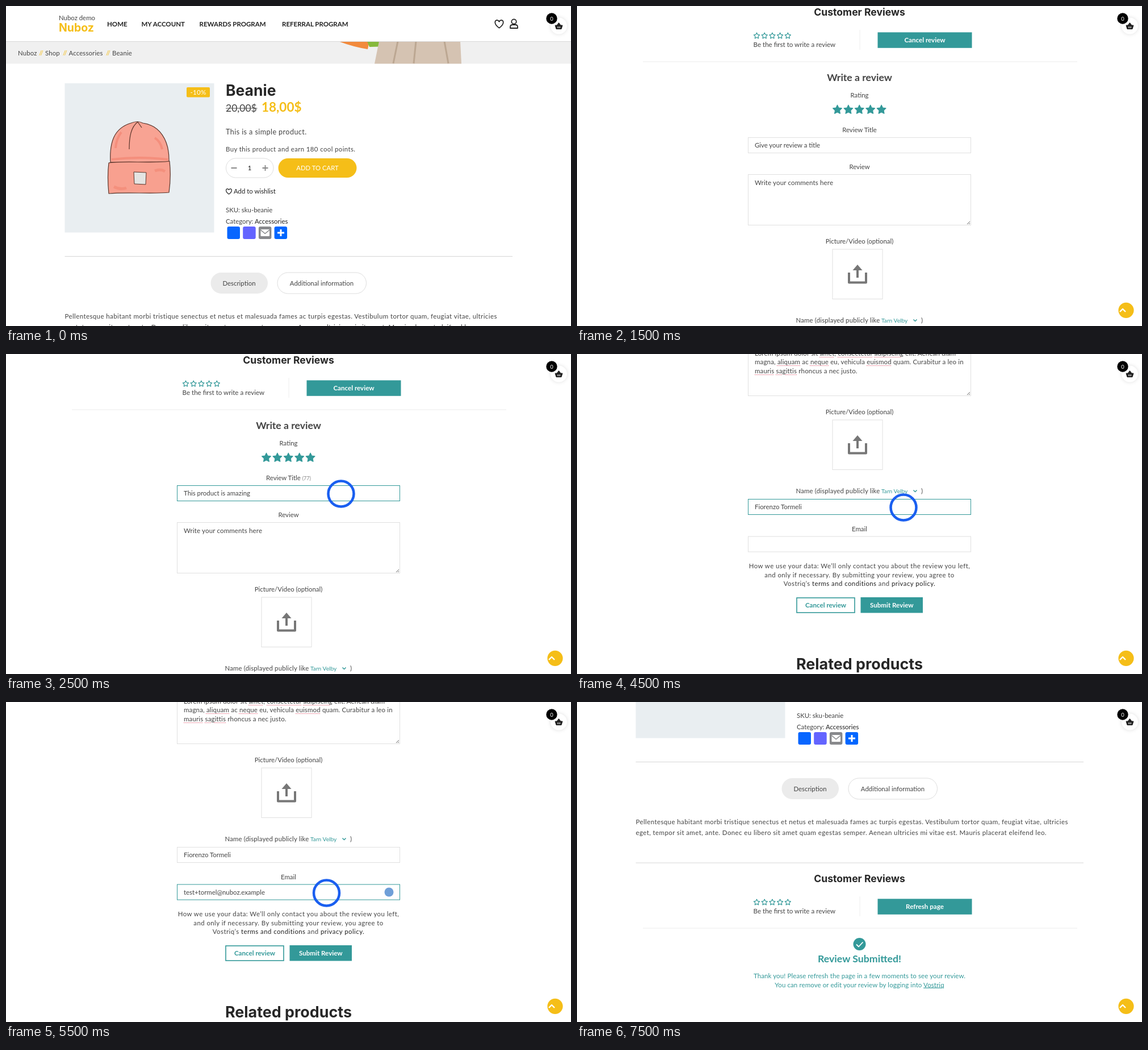
These frames come from a looping animation (995x563 px, 8000 ms). An HTML page:

```html
<!DOCTYPE html>
<html lang="en">
<head>
<meta charset="utf-8">
<style>
  html, body { margin: 0; width: 100%; height: 100%; overflow: hidden; background: #fff; }
  svg { display: block; width: 995px; height: 563px; font: 11.4px Lato, sans-serif; fill: #444; }
  .head { font-family: Inter, sans-serif; font-weight: 700; fill: #272727; }
  .bold { font-weight: 700; }
  .dark { fill: #222; }
  .teal { fill: #339999; }
  .gold { fill: #f5be18; }
  .white { fill: #fff; }
  .mid { text-anchor: middle; }
  .area { font: 11.5px/15.6px Lato, sans-serif; letter-spacing: .15px; color: #444; white-space: nowrap; }
  .area u { text-decoration: underline dotted #e0526a 1px; text-underline-offset: 2px; }
</style>
</head>
<body>
<svg id="stage" viewBox="0 0 995 563"></svg>
<script>
const TEAL = '#339999', GOLD = '#f5be18', PALE = '#e9eef1', BLUE = '#1a5ff0';

const text = (x, y, s, cls = '', size = 11.4, spacing = 0) =>
  `<text x="${x}" y="${y}" class="${cls}" font-size="${size}" letter-spacing="${spacing}">${s}</text>`;
const mid = (y, s, cls = '', size = 11.4, spacing = 0) => text(497.5, y, s, 'mid ' + cls, size, spacing);
const rect = (x, y, w, h, fill, stroke = 'none', r = 0, sw = 1) =>
  `<rect x="${x}" y="${y}" width="${w}" height="${h}" rx="${r}" fill="${fill}" stroke="${stroke}" stroke-width="${sw}"/>`;
const circle = (x, y, r, fill, extra = '') => `<circle cx="${x}" cy="${y}" r="${r}" fill="${fill}" ${extra}/>`;
const ring = (x, y, r, stroke, sw) => circle(x, y, r, 'none', `stroke="${stroke}" stroke-width="${sw}"`);
const path = (d, fill = 'none', stroke = 'none', sw = 1, extra = '') =>
  `<path d="${d}" fill="${fill}" stroke="${stroke}" stroke-width="${sw}" stroke-linejoin="round" ${extra}/>`;
const rule = (x1, y, x2, color) => path(`M${x1} ${y}H${x2}`, 'none', color);
const button = (x, y, w, h, label, fill = TEAL) =>
  rect(x, y, w, h, fill) + text(x + w / 2, y + h / 2 + 4, label, 'mid bold white', 11.6);
const badge = (x, y, label) => rect(x, y, 41, 17.5, GOLD, 'none', 2) + text(x + 20.5, y + 13, label, 'mid white', 11.6, 0.2);
const field = (y, h, focus) => rect(301.5, y, 392, h, '#fff', focus ? TEAL : '#e0e0e0');
const heart = (x, y, k, sw) =>
  path('M0 6C-10-1-6.5-7-3-6.5Q-1-6.3 0-4Q1-6.3 3-6.5C6.5-7 10-1 0 6Z', 'none', '#222', sw, `transform="translate(${x} ${y}) scale(${k})"`);

function star(cx, cy, r, fill) {
  let d = '';
  for (let i = 0; i < 10; i++) {
    const a = i * Math.PI / 5, q = i % 2 ? r * 0.5 : r;
    d += `${i ? 'L' : 'M'}${cx + q * Math.sin(a)} ${cy - q * Math.cos(a)}`;
  }
  return path(d + 'Z', fill, TEAL, 1.2);
}
const stars = (x, y, step, r, fill) => [0, 1, 2, 3, 4].map(i => star(x + i * step, y, r, fill)).join('');

function header() {
  return rect(0, 62, 995, 39.5, '#f0f0f0')
    + path('M588 62H640L637 76Q612 72 588 63Z', '#f28a3c')
    + path('M636 62H677L674 71L640 72Z', '#86b93c')
    + path('M657 62H800L802 101.5H649Z', '#d5c3b2')
    + path('M690 62L682 101M722 62L718 101M772 62L779 101', 'none', '#bca792', 3)
    + rect(0, 0, 995, 62, '#fff') + rule(0, 62.5, 995, '#d8d8d8')
    + text(93, 24.5, 'Nuboz demo') + text(93, 44.5, 'Nuboz', 'head gold', 19.5)
    + [[178, 'HOME'], [238.5, 'MY ACCOUNT'], [340.5, 'REWARDS PROGRAM'], [486, 'REFERRAL PROGRAM']]
      .map(([x, s]) => text(x, 35.5, s, 'bold dark', 11.5)).join('')
    + heart(868.5, 32, 1.1, 1.6)
    + ring(894.5, 27.5, 4.2, '#222', 1.8)
    + path('M888 39V37Q888 33 892 33H897Q901 33 901 37V39Z', 'none', '#222', 1.8)
    + [[21, 'Nuboz'], [69, 'Shop'], [110.5, 'Accessories'], [187, 'Beanie']].map(([x, s]) => text(x, 86.5, s, '', 11.4, 0.15)).join('')
    + [58, 100, 176].map(x => text(x, 86.5, '//', 'gold')).join('');
}

function beanie() {
  const ink = '#5a352b';
  return path('M184 275C182 240 190 215 220 206Q232 201 241 206C270 210 288 235 287 274Z', '#f8a393', ink, 1.2)
    + path('M186 270Q235 264 285 270M262 232Q272 238 275 252M203 222Q194 234 193 250', 'none', '#f28672', 4, 'opacity=".7"')
    + path('M181 276C200 272 262 277 288 273Q291 300 287 328C260 331 210 327 181 330Q178 300 181 276Z', '#f8a08f', ink, 1.2)
    + path('M190 318Q202 324 212 320M262 290Q272 286 280 291', 'none', '#f28672', 5, 'opacity=".6"')
    + path('M217 252C217 230 220 213 232 204L239 214', 'none', ink, 1.2)
    + path('M225 292L247 293L246 314L226 313Z', '#e4e4e2', ink);
}

function product() {
  return rect(103.5, 136, 263, 262.5, PALE) + beanie() + badge(318, 143, '-10%')
    + text(387, 157.5, 'Beanie', 'head', 26.5)
    + text(387, 185.5, '20,00$', '', 17.5) + rule(387, 180, 442.5, '#555')
    + text(450, 185.5, '18,00$', 'bold gold', 22.5)
    + text(387, 226, 'This is a simple product.', '', 12.6, 0.42)
    + text(387, 255.5, 'Buy this product and earn 180 cool points.', '', 11.4, 0.4)
    + rect(387.5, 268, 83.5, 34, '#fff', '#ddd', 17)
    + path('M396.5 285H406.5M451.5 285H461.5M456.5 280V290', 'none', '#888', 1.8)
    + text(429, 289, '1', 'mid dark')
    + rect(479.5, 268, 138, 34, GOLD, 'none', 17) + text(548.5, 289, 'ADD TO CART', 'mid white', 11.3)
    + heart(392.5, 326.5, 0.75, 1.6) + text(401, 330, 'Add to wishlist', 'dark')
    + text(387, 363, 'SKU: sku-beanie') + text(387, 382.5, 'Category: <tspan class="dark">Accessories</tspan>')
    + ['#0866ff', '#6364ff', '#88898c', '#0166ff'].map((c, i) => rect(389.5 + i * 27.7, 388, 22.5, 22, c, 'none', 3)).join('')
    + rect(448.5, 393, 15.5, 12, '#fff', 'none', 1) + path('M448.5 394L456.2 400.5L464 394', 'none', '#88898c', 1.6)
    + path('M478 399H490M484 393V405', 'none', '#fff', 3)
    + rule(103.5, 440.5, 892, '#d6d6d6')
    + rect(360.5, 469, 100.5, 37, '#ebebeb', 'none', 18.5) + text(410.5, 491.5, 'Description', 'mid')
    + rect(478, 469, 156.5, 37, '#fff', '#ddd', 18.5) + text(556, 491.5, 'Additional information', 'mid')
    + text(103.5, 549.5, 'Pellentesque habitant morbi tristique senectus et netus et malesuada fames ac turpis egestas. Vestibulum tortor quam, feugiat vitae, ultricies', '', 11.5, 0.4)
    + text(103.5, 568.5, 'eget, tempor sit amet, ante. Donec eu libero sit amet quam egestas semper. Aenean ultricies mi vitae est. Mauris placerat eleifend leo.', '', 11.5, 0.4)
    + rule(103.5, 618, 892, '#d6d6d6');
}

function reviews({ action, hover }) {
  return mid(652, 'Customer Reviews', 'head', 17.6)
    + stars(316.5, 687.5, 13.7, 5.4, 'none') + text(310.5, 707, 'Be the first to write a review', '', 11.6)
    + path('M498 677V712', 'none', '#eee') + button(529.5, 681.3, 166, 27.5, action, hover ? '#62aeae' : TEAL);
}

function form({ title, body, name, email, focus }) {
  const count = n => ` <tspan font-size="9" fill="#888">(${n})</tspan>`;
  const comment = body
    ? `Lorem ipsum dolor sit <u>amet</u>, <u>consectetur</u> <u>adipiscing</u> elit. Aenean diam<br>
       magna, <u>aliquam</u> ac <u>neque</u> eu, vehicula <u>euismod</u> quam. Curabitur a leo in<br>
       <u>mauris</u> <u>sagittis</u> rhoncus a nec justo.`
    : 'Write your comments here';
  return rule(116, 733, 881, '#ececec')
    + mid(767, 'Write a review', 'bold', 17.6) + mid(796, 'Rating') + stars(458.5, 817.5, 19.4, 8.3, TEAL)
    + mid(856.5, 'Review Title' + (title ? count(77) : '')) + field(866.5, 27, focus === 'title')
    + text(313, 884, title ? 'This product is amazing' : 'Give your review a title')
    + mid(922, 'Review' + (body ? count(4824) : '')) + field(931.5, 89, focus === 'body')
    + `<foreignObject x="313" y="937.5" width="378" height="80"><div class="area">${comment}</div></foreignObject>`
    + path('M687 1019L692 1014M690 1019L692 1017', 'none', '#666')
    + mid(1053, 'Picture/Video (optional)') + rect(450, 1063, 88, 87.5, '#fff', '#e0e0e0')
    + path('M479 1104V1121.5H509V1104M494 1113V1097', 'none', '#777', 4) + path('M485.5 1100L494 1090L502.5 1100Z', '#777')
    + text(385.5, 1191.5, 'Name (displayed publicly like', '', 11.4, 0.17) + text(536, 1191.5, 'Tarn Velby', 'teal', 10.2)
    + path('M592.5 1186.5L595.5 1189.5L598.5 1186.5', 'none', TEAL, 1.5) + text(606, 1191.5, ')')
    + field(1202.5, 27, focus === 'name') + text(313, 1220, name ? 'Fiorenzo Tormeli' : '')
    + mid(1258.5, 'Email') + field(1268, 27, focus === 'email')
    + (email ? text(313, 1286, 'test+tormel@nuboz.example') + circle(674.5, 1281.5, 8, '#6f9fd8') : '')
    + mid(1324, 'How we use your data: We’ll only contact you about the review you left,', '', 11.4, 0.45)
    + mid(1339.5, 'and only if necessary. By submitting your review, you agree to', '', 11.4, 0.45)
    + mid(1355, 'Vostriq’s <tspan class="dark">terms and conditions</tspan> and <tspan class="dark">privacy policy.</tspan>', '', 11.4, 0.45)
    + rect(387, 1376, 102, 26, '#fff', TEAL, 0, 1.6) + text(438, 1393, 'Cancel review', 'mid bold teal', 11.6)
    + button(499.5, 1375, 109.5, 27.5, 'Submit Review');
}

function submitted() {
  return rule(116, 733, 881, '#ececec')
    + circle(497.5, 761, 11, TEAL) + path('M492 761.5L496 765.5L503.5 757.5', 'none', '#fff', 1.8)
    + mid(792.5, 'Review Submitted!', 'bold teal', 17.7)
    + mid(821, 'Thank you! Please refresh the page in a few moments to see your review.', 'teal', 11.5, 0.1)
    + mid(836.5, 'You can remove or edit your review by logging into <tspan text-decoration="underline">Vostriq</tspan>', 'teal', 11.5, 0.1);
}

function related(y) {
  const ink = '#4a3a2c';
  const items = [
    '<ellipse cx="108" cy="94" rx="48" ry="28" fill="none" stroke="#8a5a44" stroke-width="6"/>',
    path('M38 108C40 78 55 58 80 56C105 56 118 80 120 102L146 116Q110 112 38 108Z', '#f6d58c', ink),
    path('M50 108C48 68 68 49 89 47C116 49 130 72 129 108Q90 118 50 108ZM89 47Q76 70 78 110', '#8cc6dc', ink),
    ''
  ];
  const labels = ['-15%', '-11%', '-10%'];
  return mid(y + 9, 'Related products', 'head', 26.9)
    + items.map((item, i) => `<g transform="translate(${103.7 + i * 202} ${y + 40})">${rect(0, 0, 181.7, 182, PALE)}${item}${
      labels[i] ? badge(133, 7, labels[i]) : ''}</g>`).join('');
}

function overlay({ scroll, cursor, press }) {
  let out = circle(973.5, 35, 14.5, '#fff', 'style="filter:drop-shadow(0 0 3px #0002)"')
    + path('M967 34H980L978 40.5H969ZM970 34L973.5 29.5L977 34', '#222', '#222', 1)
    + path('M971.5 36V39M973.5 36V39M975.5 36V39', 'none', '#fff', 0.8)
    + circle(961, 22, 9.7, '#000') + text(961, 25.5, '0', 'mid white', 9.5);
  if (scroll) out += circle(967, 535.3, 13.6, GOLD) + path('M956 538L961 533L966 538', 'none', '#fff', 2.4);
  if (press) out += ring(...cursor, 25.5, '#8fb4f7', 5);
  if (cursor) out += ring(...cursor, 22.5, BLUE, 4.5);
  return out;
}

const write = { view: 'form', action: 'Cancel review', scroll: 635 };
const filled = { ...write, title: true, body: true };
const done = { view: 'done', action: 'Refresh page' };
const scenes = [
  { scroll: 0, action: 'Write a review' },
  { scroll: 331, action: 'Write a review', hover: true, cursor: [630, 368], press: true },
  write,
  { ...write, title: true, focus: 'title', cursor: [590, 246] },
  { ...filled, focus: 'body', cursor: [617.5, 351.5] },
  { ...filled, scroll: 947, name: true, focus: 'name', cursor: [575, 270] },
  { ...filled, scroll: 947, name: true, email: true, focus: 'email', cursor: [564.5, 336] },
  { ...done, scroll: 635 },
  { ...done, scroll: 335 }
];

function render(s) {
  const extra = s.view === 'form' ? form(s) + related(1493)
    : s.view === 'done' ? submitted() + related(930) : related(789);
  return `<g transform="translate(0 ${-s.scroll})">${header()}${product()}${reviews(s)}${extra}</g>${overlay(s)}`;
}

const stage = document.getElementById('stage');
const start = performance.now();
let shown = -1;
function tick() {
  const time = (performance.now() - start) % 8000;
  const index = Math.floor((time + 500) / 1000);
  if (index !== shown) stage.innerHTML = render(scenes[shown = index]);
  requestAnimationFrame(tick);
}
tick();
</script>
</body>
</html>
```
